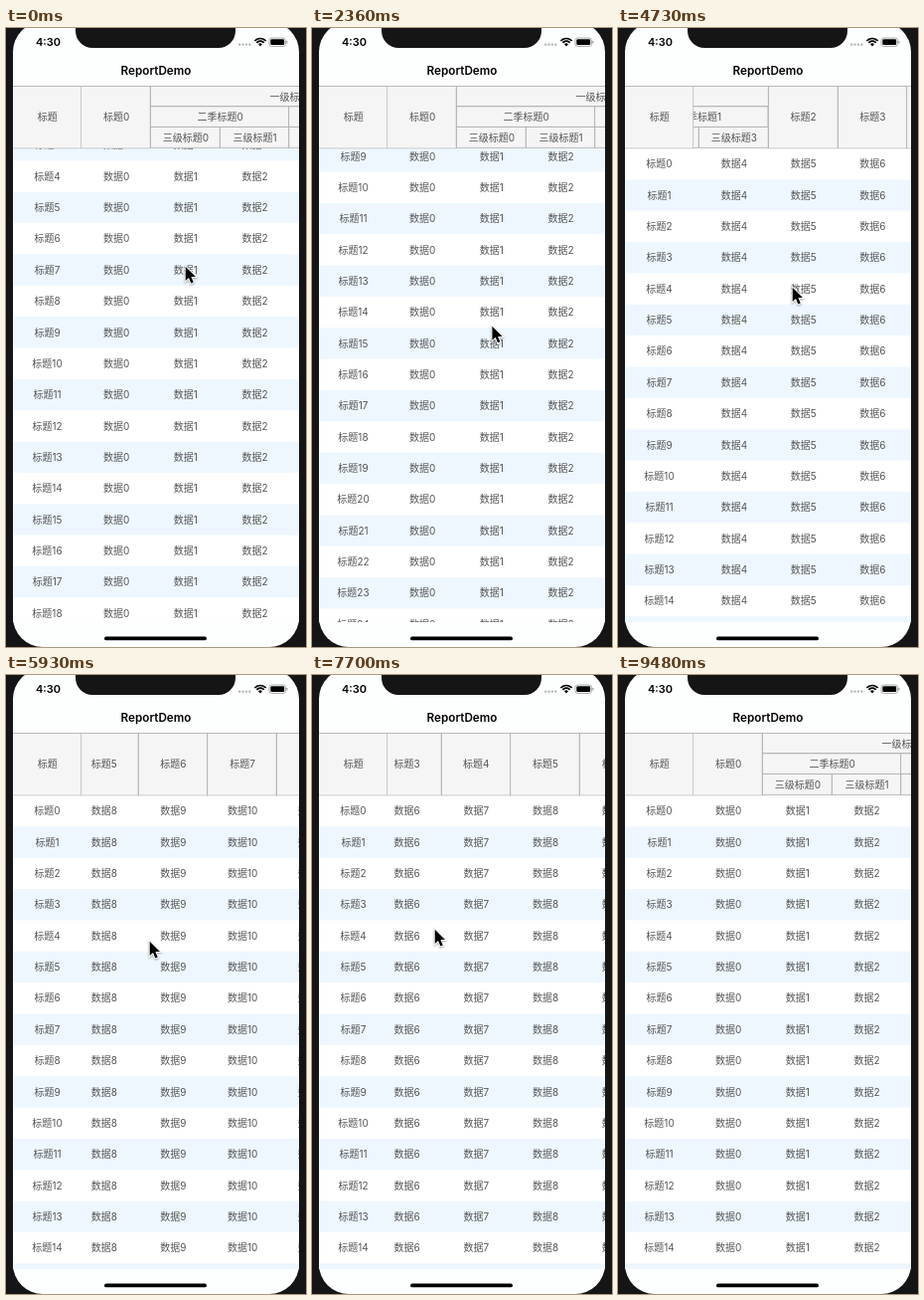
An HTML page with a canvas that plays this animation: 302x622 px, repeating every 9.97 s.

```html
<!DOCTYPE html>
<html lang="zh">
<head>
<meta charset="utf-8">
<style>
  html, body { margin: 0; width: 100%; height: 100%; overflow: hidden; background: #151515; }
  canvas { display: block; }
</style>
</head>
<body>
<canvas id="stage" width="302" height="622"></canvas>
<script>
const ctx = document.getElementById('stage').getContext('2d');
const LOOP = 9970, REST = 434, TICK = 148.1;
const LEFT = 7, RIGHT = 295, TOP = 58.5, BODY = 121, BOTTOM = 597;
const FIRST = 76.3, COL = 69.7, ROW = 31.35, ROWS = 25, COLS = 14;
const FONT = 'Inter, "Noto Sans CJK SC", "Noto Sans CJK", sans-serif';

const scrollY = [[-1, 113], [0, 124], [4, 262], [5, 296], [6, 311], [7, 309], [8, 308], [12, 308],
  [13, 290], [14, 240], [16, 75], [17, -10], [18, -4], [19, -0.5], [20, 0]];
const scrollX = [[21, 0], [22, 10], [24, 90], [26, 180], [29, 273], [31, 370], [32, 410], [33, 430], [34, 430],
  [35, 480], [36, 540], [37, 570], [39, 590], [41, 600], [43, 604.6], [45, 604.6],
  [46, 590], [49, 433.7], [52, 280], [55, 130], [57, 50], [59, 8], [61, 0]];
const pointer = [[-1, 180, 239], [4, 173, 311], [8, 176, 306], [12, 176, 306], [19, 209, 256], [21, 209, 256],
  [29, 175, 260], [33, 196, 264], [34, 196, 264], [37, 144, 267], [43, 85, 264], [45, 85, 264],
  [49, 123, 255], [53, 292, 310], [59, 304, 640]];

function sample(keys, k, i = 1) {
  const next = keys.findIndex(key => key[0] > k);
  if (next === 0) return keys[0][i];
  if (next < 0) return keys[keys.length - 1][i];
  const a = keys[next - 1], b = keys[next];
  return a[i] + (b[i] - a[i]) * (k - a[0]) / (b[0] - a[0]);
}

function rect(x, y, w, h, color) {
  ctx.fillStyle = color;
  ctx.fillRect(x, y, w, h);
}

function round(x, y, w, h, r, color) {
  ctx.fillStyle = color;
  ctx.beginPath();
  ctx.roundRect(x, y, w, h, r);
  ctx.fill();
}

function label(text, x, y, color = '#555', font = '10px ') {
  ctx.font = font + FONT;
  ctx.textAlign = 'center';
  ctx.fillStyle = color;
  ctx.fillText(text, x, y + 3.7);
}

function clipped(x, y, w, h, draw) {
  ctx.save();
  ctx.beginPath();
  ctx.rect(x, y, w, h);
  ctx.clip();
  draw();
  ctx.restore();
}

function headCell(text, x, level, w, levels) {
  const y = TOP + level * 20.85, h = levels * 20.85;
  rect(x, y, w, h, '#f5f5f5');
  ctx.strokeStyle = '#b4b4b4';
  ctx.lineWidth = 0.9;
  ctx.strokeRect(Math.round(x) - 0.5, Math.round(y) - 0.5, w, h);
  label(text, x + w / 2, y + h / 2);
}

function rows(sy, cell) {
  for (let r = 0; r < ROWS; r++) {
    const y = BODY + r * ROW - sy;
    if (y > BODY - ROW && y < BOTTOM) cell(r, y);
  }
}

function table(sx, sy) {
  const colX = c => FIRST + c * COL - sx;
  const wide = RIGHT - FIRST;

  clipped(LEFT, BODY, RIGHT - LEFT, BOTTOM - BODY, () => rows(sy, (r, y) => {
    if (r % 2) rect(LEFT, y, RIGHT - LEFT, ROW, '#eef7ff');
    label('标题' + r, 41.5, y + ROW / 2);
  }));
  clipped(FIRST, BODY, wide, BOTTOM - BODY, () => rows(sy, (r, y) => {
    for (let c = 0; c < COLS; c++) {
      if (colX(c) > FIRST - COL && colX(c) < RIGHT) label('数据' + c, colX(c) + COL / 2, y + ROW / 2);
    }
  }));

  ctx.save();
  ctx.translate(0, Math.max(0, -sy));
  clipped(FIRST - 0.3, TOP - 1, wide + 0.3, 64, () => {
    headCell('标题0', colX(0), 0, COL, 3);
    headCell('一级标题', colX(1), 0, COL * 4, 1);
    for (let i = 0; i < 2; i++) headCell('二季标题' + i, colX(1 + i * 2), 1, COL * 2, 1);
    for (let i = 0; i < 4; i++) headCell('三级标题' + i, colX(1 + i), 2, COL, 1);
    for (let c = 5; c < COLS; c++) headCell('标题' + (c - 3), colX(c), 0, COL, 3);
  });
  clipped(LEFT, TOP - 1, FIRST - LEFT, 64, () => headCell('标题', LEFT, 0, FIRST - LEFT, 3));
  ctx.restore();
}

function statusBar() {
  label('4:30', 42.5, 14, '#000', '600 11px ');
  for (let i = 0; i < 4; i++) round(234 + i * 3.4, 15.5, 2.3, 2.3, 0.8, '#b5b5b5');

  ctx.strokeStyle = ctx.fillStyle = '#000';
  ctx.lineWidth = 1.7;
  for (const r of [7.5, 4.8]) {
    ctx.beginPath();
    ctx.arc(256, 18, r, -Math.PI * 0.77, -Math.PI * 0.23);
    ctx.stroke();
  }
  ctx.beginPath();
  ctx.moveTo(256, 18.5);
  ctx.arc(256, 18, 2.6, -Math.PI * 0.77, -Math.PI * 0.23);
  ctx.fill();

  ctx.strokeStyle = '#999';
  ctx.lineWidth = 0.8;
  ctx.beginPath();
  ctx.roundRect(265, 10, 16.5, 8.4, 2.4);
  ctx.stroke();
  round(266.3, 11.3, 13.9, 5.8, 1.3, '#000');
  round(282.3, 12.8, 1.2, 2.8, 0.6, '#999');
}

function arrow(x, y) {
  ctx.save();
  ctx.translate(x, y);
  ctx.shadowColor = 'rgba(0,0,0,.35)';
  ctx.shadowBlur = 2;
  ctx.shadowOffsetY = 1;
  const shape = new Path2D('M.7 .8V15L4 12L6.3 17.5L8.7 16.5L6.4 11.1H11Z');
  ctx.lineWidth = 2;
  ctx.strokeStyle = '#fff';
  ctx.stroke(shape);
  ctx.shadowColor = 'transparent';
  ctx.fillStyle = '#000';
  ctx.fill(shape);
  ctx.restore();
}

function draw(now) {
  const k = Math.max(-1, Math.floor((now % LOOP - REST) / TICK));
  rect(0, 0, 302, 622, '#151515');
  round(LEFT, -6, RIGHT - LEFT, 628, 30, '#fdfefe');
  clipped(LEFT, BODY, RIGHT - LEFT, BOTTOM - BODY, () => rect(LEFT, BODY, 288, 476, '#fff'));
  table(sample(scrollX, k), sample(scrollY, k));
  round(70, -20, 161, 40, 17, '#151515');
  statusBar();
  label('ReportDemo', 151, 43.5, '#000', '600 11.7px ');
  round(99, 611.5, 103, 3.8, 1.9, '#000');
  arrow(sample(pointer, k, 1), sample(pointer, k, 2));
}

function frame() {
  draw(performance.now());
  requestAnimationFrame(frame);
}
frame();
</script>
</body>
</html>
```
